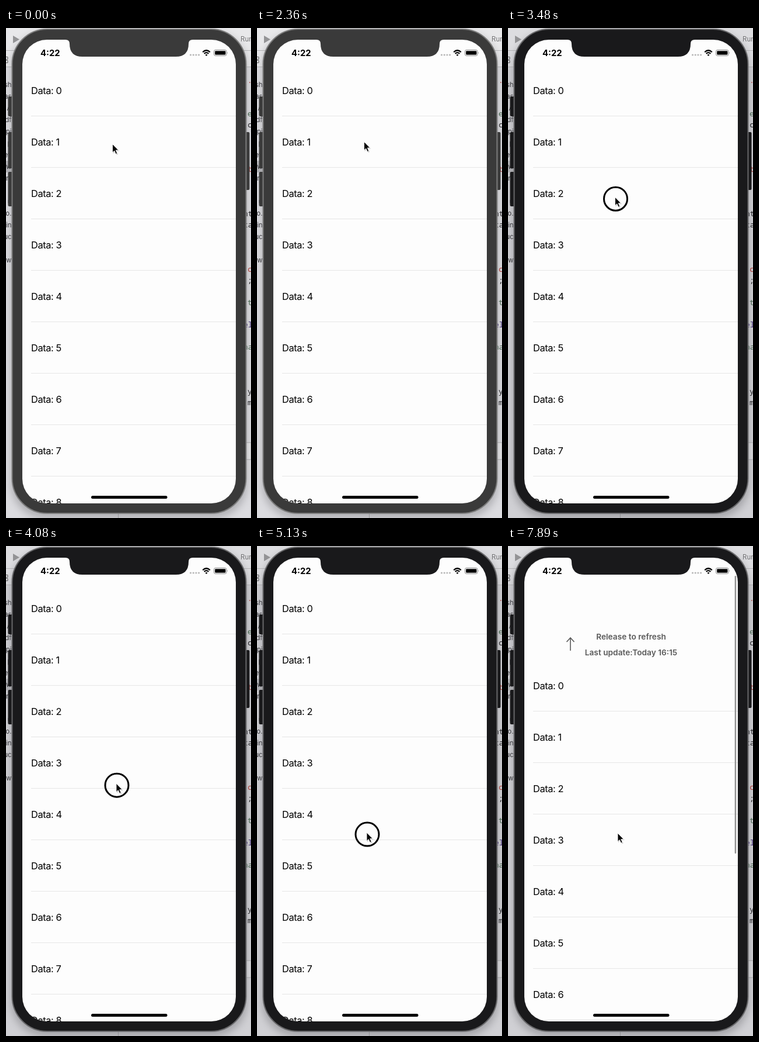
An HTML page for the animation above (7.99 s loop, 420 by 838 pixels).

```html
<!DOCTYPE html>
<html lang="en">
<head>
<meta charset="utf-8">
<title>Pull to refresh</title>
<style>
  html, body { margin: 0; width: 100%; height: 100%; overflow: hidden; }
  svg {
    display: block; width: 100%; height: 100%;
    --case: #3a3a3a; --edge: #7c7c7c; --desk: #dcdce0; --bar: #e8e8ea; --shade: #88888c;
    font-family: Inter, Roboto, sans-serif;
  }
  svg.dim { --case: #19191b; --edge: #68686a; --desk: #d0d0d4; --bar: #dddde0; --shade: #7c7c80; }
  .row text { font-size: 16.4px; letter-spacing: -.4px; }
  .header text { font-size: 13.7px; font-weight: 600; fill: #5a5a5a; text-anchor: middle; }
  .side { font-size: 11.5px; fill: #2c2c30; text-anchor: end; }
  .code { font: 13px "Noto Sans Mono", monospace; }
</style>
</head>
<body>
<svg id="stage" viewBox="0 0 420 838" preserveAspectRatio="none">
  <defs>
    <clipPath id="screen"><rect x="28" y="20" width="366" height="793" rx="42"/></clipPath>
    <clipPath id="list"><rect x="28" y="49" width="366" height="764"/></clipPath>
    <filter id="blur"><feGaussianBlur stdDeviation="7"/></filter>
  </defs>

  <g id="desktop">
    <rect width="420" height="838" fill="var(--desk)"/>
    <rect width="420" height="66" fill="var(--bar)"/>
    <path d="M0 38.5H420M0 66.5H420" stroke="#b4b4b6"/>
    <path d="M12 13L23 19.5L12 26Z" fill="#949496"/>
    <text x="402" y="23" font-size="11.5" fill="#747476">Run</text>
    <path d="M0 49.5H3V53.5H0M0 55.5H3V59.5H0" fill="none" stroke="#555"/>
    <rect y="227" width="12" height="20" fill="#b4b4b8"/>
    <rect x="405" y="709" width="15" height="29" fill="var(--bar)" stroke="#a8a8aa"/>
    <path d="M192.500 826V838" stroke="#a4a4a6"/>
  </g>

  <rect x="9" y="8" width="404" height="830" rx="58" fill="var(--shade)" opacity=".55" filter="url(#blur)"/>
  <g fill="var(--case)">
    <rect x="3.500" y="117" width="9" height="34" rx="2"/>
    <rect x="3.500" y="178" width="9" height="62" rx="2"/>
    <rect x="3.500" y="246" width="9" height="59" rx="2"/>
    <rect x="409" y="178" width="8.500" height="99" rx="2"/>
    <rect x="10.500" y="2" width="401" height="828" rx="60" stroke="var(--edge)" stroke-width="2"/>
  </g>

  <g clip-path="url(#screen)">
    <rect x="28" y="20" width="366" height="793" fill="#fdfdfd"/>
    <g clip-path="url(#list)">
      <g id="scroll">
        <g class="header" id="header">
          <text id="hint" x="211" y="28"></text>
          <text x="211" y="54.500">Last update:Today 16:15</text>
          <path id="arrow" d="M107 47V25M100.500 32L107 25L113.500 32" fill="none" stroke="#5a5a5a" stroke-width="1.600"/>
        </g>
        <g id="rows"></g>
      </g>
      <rect id="thumb" x="388.700" y="51" width="2.500" rx="1.250" fill="#929292"/>
    </g>
    <path d="M102 19V20Q109 20 109 27Q109 49 131 49H291Q313 49 313 27Q313 20 320 20V19Z" fill="var(--case)"/>
    <text x="59" y="47.800" font-size="14.800" font-weight="700">4:22</text>
    <g fill="#b8b8b8">
      <circle cx="316.500" cy="46" r="1.600"/><circle cx="321.200" cy="46" r="1.600"/>
      <circle cx="325.900" cy="46" r="1.600"/><circle cx="330.600" cy="46" r="1.600"/>
    </g>
    <path d="M337.200 41.200Q343.500 35.300 349.800 41.200M339.700 43.900Q343.500 40.500 347.300 43.900" fill="none" stroke="#000" stroke-width="2.200"/>
    <path d="M341.500 45.900Q343.500 44.200 345.500 45.900L343.500 48Z"/>
    <rect x="356.500" y="37.500" width="21.500" height="10" rx="2.600" fill="none" stroke="#8a8a8a"/>
    <rect x="358.200" y="39.200" width="18.200" height="6.600" rx="1.200"/>
    <path d="M379.300 40.800Q381 42.500 379.300 44.200Z" fill="#8a8a8a"/>
    <rect x="146" y="800" width="130.500" height="5" rx="2.500"/>
  </g>

  <g id="pointer">
    <circle id="ring" cx="1" cy="3" r="20" fill="none" stroke="#000" stroke-width="3"/>
    <path d="M0 0V15.200L3.500 12L6 17.600L8.800 16.400L6.300 11H11Z" transform="translate(1 1)" fill="#808080" opacity=".35"/>
    <path d="M0 0V14.500L3.300 11.500L5.700 17L8.200 15.900L5.800 10.500H10.300Z" fill="#050505" stroke="#fff" stroke-width=".9"/>
  </g>
</svg>

<script>
const LOOP = 7990;
const DIM_AT = 2500, PRESS_AT = 2700, RELEASE_AT = 7600;
const PULL = { start: 5230, length: 450, distance: 132, trigger: 54 };
const ROW = 88;
// time, x, y of the pointer tip
const PATH = [
  [0, 182.5, 198.5], [2360, 183.5, 194.5], [2800, 183.5, 197], [3150, 183.5, 230],
  [3480, 183.5, 289], [4080, 189, 406], [4600, 188.3, 476], [5000, 188, 490], [6310, 188, 491]
];

const $ = id => document.getElementById(id);
const clamp = v => Math.max(0, Math.min(1, v));

function add(parent, tag, attrs, text = "") {
  const el = document.createElementNS("http://www.w3.org/2000/svg", tag);
  for (const name in attrs) el.setAttribute(name, attrs[name]);
  el.textContent = text;
  return parent.appendChild(el);
}

// Editor text peeking out beside the phone
["sh", "as", "A", "df", "pi", "p", "ev", "ew", "ni", "s", "u", "o.", "in", "uc", "", "ew"]
  .forEach((s, i) => add($("desktop"), "text", { class: "side", x: 9.5, y: 101 + i * 20 }, s));

const RED = "#b42a22", GREEN = "#3f6248", INK = "#141416";
[[94, ".", RED], [151, "e", GREEN], [170, "c", INK], [246, "t", RED], [322, "nt", INK],
 [341, "ta", INK], [417, "c", RED], [436, ";", INK], [474, "t", GREEN], [512, "el", "#3b2475"],
 [550, "na", GREEN], [626, "y", INK], [645, "m", INK]]
  .forEach(([y, s, fill]) =>
    add($("desktop"), "text", { class: "code", x: s.length > 1 ? 407 : 414, y, fill }, s));

for (let i = 0; i < 9; i++) {
  const row = add($("rows"), "g", { class: "row" });
  add(row, "text", { x: 43, y: 113 + i * ROW }, "Data: " + i);
  add(row, "rect", { x: 43, y: 150 + i * ROW, width: 351, height: 1, fill: "#e6e6e6" });
}

function pointerAt(t) {
  const next = PATH.findIndex(p => p[0] > t);
  if (next < 0) return PATH[PATH.length - 1].slice(1);
  const a = PATH[next - 1], b = PATH[next], k = (t - a[0]) / (b[0] - a[0]);
  return [1, 2].map(i => a[i] + (b[i] - a[i]) * k);
}

const easeOut = k => 1 - (1 - k) ** 3;
const triggerTime = PULL.start + PULL.length * (1 - Math.cbrt(1 - PULL.trigger / PULL.distance));

function draw(t) {
  const offset = PULL.distance * easeOut(clamp((t - PULL.start) / PULL.length));
  const [x, y] = pointerAt(t);
  const turn = 180 * (1 - clamp((t - triggerTime) / 400));

  $("stage").classList.toggle("dim", t >= DIM_AT);
  $("pointer").setAttribute("transform", `translate(${x} ${y})`);
  $("ring").style.display = t >= PRESS_AT && t < RELEASE_AT ? "" : "none";

  $("scroll").setAttribute("transform", `translate(0 ${offset})`);
  $("header").style.opacity = clamp(offset / PULL.trigger);
  $("hint").textContent = t < triggerTime ? "Pull down to refresh" : "Release to refresh";
  $("arrow").setAttribute("transform", `rotate(${turn} 107 36)`);
  $("thumb").style.display = offset > 0 ? "" : "none";
  $("thumb").setAttribute("height", 607 - offset);
}

const began = performance.now();
function tick() {
  draw((performance.now() - began) % LOOP);
  requestAnimationFrame(tick);
}
tick();
</script>
</body>
</html>
```
